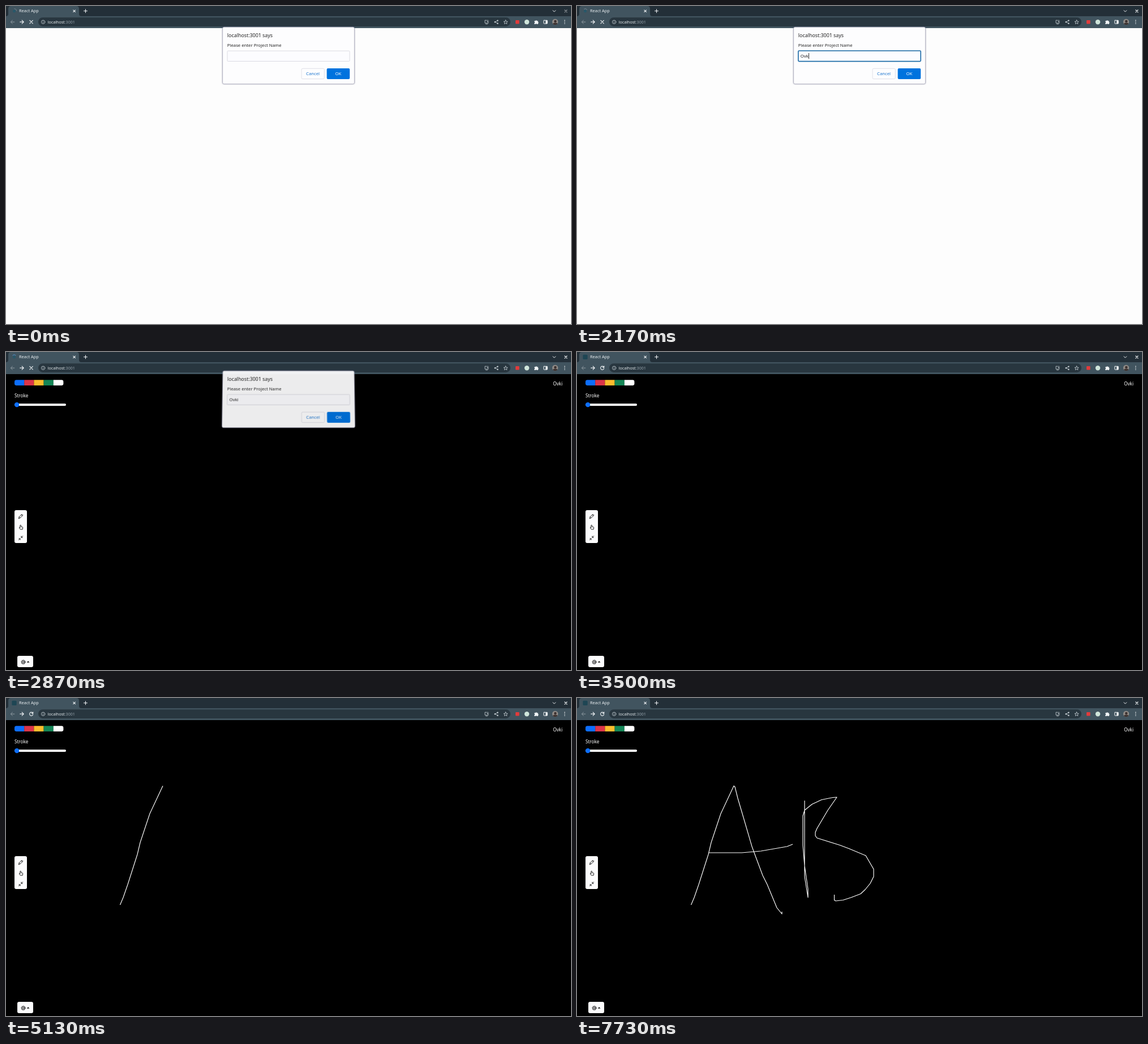
An HTML page for the animation above (8000 ms loop, 998 by 561 pixels).

```html
<!DOCTYPE html>
<html lang="en">
<head>
<meta charset="utf-8">
<title>Whiteboard</title>
<style>
  html, body { margin: 0; width: 100%; height: 100%; overflow: hidden; }
  body { position: relative; background: #fdfdfd; }
  svg { position: absolute; left: 0; top: 0; display: block; }
  text { font-family: "Noto Sans", "Open Sans", sans-serif; white-space: pre; }
  .line { fill: none; stroke: #f1f4f6; stroke-linecap: round; stroke-linejoin: round; }
  .ink { fill: none; stroke: #111; stroke-width: .9; stroke-linecap: round; stroke-linejoin: round; }
  #app { --paper: #f7f7fd; --button: #f7f7fb; }
  #app.dark { --paper: #fff; --button: #fcfcfd; }
  .paper { fill: var(--paper); }
  .button { fill: var(--button); }
  #dialog { transform-origin: 499px 65px; }
  #card { filter: drop-shadow(0 .6px 1px #4a4a6a99); }
</style>
</head>
<body>
<svg width="998" height="561">
  <rect id="page" y="38" width="998" height="523"/>

  <g id="app">
    <clipPath id="pill"><rect x="15" y="49.3" width="86.5" height="9.6" rx="3.4"/></clipPath>
    <g clip-path="url(#pill)">
      <rect x="15" y="49" width="17.2" height="10" fill="#0d6efd"/>
      <rect x="32.2" y="49" width="17.2" height="10" fill="#dc3549"/>
      <rect x="49.4" y="49" width="17.2" height="10" fill="#fdbd2e"/>
      <rect x="66.6" y="49" width="17.2" height="10" fill="#148656"/>
      <rect x="83.8" y="49" width="18" height="10" class="paper"/>
    </g>
    <text class="paper" x="15" y="79.5" font-size="8.1">Stroke</text>
    <rect class="paper" x="15" y="91" width="91" height="4.1" rx="2"/>
    <circle cx="19.2" cy="93" r="4.2" fill="#0d6efd"/>
    <text class="paper" x="983" y="58.7" font-size="8.1" text-anchor="end">Ovki</text>

    <rect class="button" x="15" y="279" width="22" height="58" rx="3"/>
    <g class="ink">
      <path d="M22.3 293.6l.9-2.7 4.8-4.8 1.8 1.8-4.8 4.8zM26.8 287.3l1.8 1.8M23.2 290.9l1.8 1.8"/>
      <path d="M24.8 309.5v-3.7q.9-1.2 1.8 0v2.4l2.4.5q.8.3.7 1.3l-.5 2.9h-3.9l-2.1-2.9q.2-1.2 1.6-.5z"/>
      <path d="M29.6 324.6l-2.6 2.6m0-2.3v2.3h2.3M22.4 331.7l2.6-2.6m-2.3 0H25v2.3"/>
    </g>
    <rect class="button" x="20" y="536" width="28" height="20" rx="3"/>
    <g class="ink">
      <circle cx="30.6" cy="547" r="3.1"/>
      <circle cx="30.6" cy="547" r="3.8" stroke-dasharray="1 1.98" stroke-linecap="butt"/>
      <circle cx="30.6" cy="547" r="1.4"/>
    </g>
    <path d="M36.7 547.7l2.4-2.6 2.4 2.6z" fill="#111"/>
  </g>

  <g id="strokes" fill="none" stroke="#fff" stroke-width="1.15" stroke-linejoin="round"></g>

  <rect width="998" height="18" fill="#232f38"/>
  <rect y="18" width="998" height="21" fill="#41545f"/>
  <path d="M0 18q4 0 4-4V5q0-5 5-5h115q5 0 5 5v9q0 4 4 4z" fill="#41545f"/>
  <rect x="57" y="20.3" width="834" height="15.6" rx="7.8" fill="#28363f"/>

  <g id="favicon"></g>
  <text x="23" y="11.4" font-size="7.4" fill="#e9eef1">React App</text>
  <g class="line">
    <path d="M118.8 7.1l3.6 3.6m0-3.6l-3.6 3.6M137.5 8.8h6m-3-3v6" stroke-width="1.1"/>
    <path d="M966 7.8l2.4 2.4 2.4-2.4"/>
    <path id="close" d="M986.9 7l4 4m0-4l-4 4" stroke-width="1.2"/>
    <path d="M14.8 28.2H8.4m3-3l-3 3 3 3" stroke="#8e9aa1" style="stroke:#8e9aa1"/>
    <path d="M24.8 28.2h6.4m-3-3l3 3-3 3" stroke-width="1.2"/>
    <path id="stop" d="M41.9 25.4l5.4 5.4m0-5.4l-5.4 5.4" stroke-width="1.2"/>
    <path id="reload" d="M47.3 26.6a3.1 3.1 0 1 0 .4 2.3M47.8 24.7v2.4h-2.4" stroke-width="1.1"/>
    <g style="stroke:#cbd3d8" stroke-width=".8">
      <circle cx="65.6" cy="28.2" r="3.2"/>
      <path d="M65.6 28v1.8M65.6 26.5v.1"/>
      <path d="M849 25.2h-3v5h6v-1.2M847.5 31.8h3M851 24.8v3.4m-1.5-1.5l1.5 1.5 1.5-1.5"/>
      <path d="M868.2 25.8l-4.4 2.4 4.4 2.4"/>
      <path d="M882.6 24.8l1 2.4 2.6.2-2 1.7.6 2.5-2.2-1.4-2.2 1.4.6-2.5-2-1.7 2.6-.2z"/>
    </g>
    <rect x="949.8" y="25.3" width="6.4" height="5.8" rx=".5"/>
  </g>
  <g fill="#cbd3d8">
    <circle cx="868.4" cy="25.7" r="1.2"/><circle cx="863.8" cy="28.2" r="1.2"/><circle cx="868.4" cy="30.7" r="1.2"/>
  </g>
  <text x="73.7" y="30.7" font-size="7.1" fill="#e4eaed">localhost<tspan fill="#98a5ad">:3001</tspan></text>
  <rect x="900" y="25" width="6.6" height="6.4" rx="1" fill="#e23b3b"/>
  <circle cx="920" cy="28.2" r="4.2" fill="#cfe5da"/>
  <g fill="#f1f4f6">
    <path d="M933.3 26.2h2a1.3 1.3 0 0 1 2.5 0h1.9v2a1.3 1.3 0 0 1 0 2.5v1.3h-2a1.2 1.2 0 0 0-2.3 0h-2.1v-2a1.2 1.2 0 0 0 0-2.3z"/>
    <path d="M953.2 25.3h3v5.8h-3z"/>
    <circle cx="986.8" cy="25.4" r=".8"/><circle cx="986.8" cy="28.2" r=".8"/><circle cx="986.8" cy="31" r=".8"/>
  </g>
  <clipPath id="round"><circle cx="970" cy="28" r="5.2"/></clipPath>
  <g clip-path="url(#round)">
    <path d="M964 22h12v12h-12z" fill="#8f8a86"/>
    <circle cx="970.3" cy="27" r="2.3" fill="#3c3230"/>
    <path d="M965 34q0-4.6 5.2-4.6t5.2 4.6z" fill="#3c3230"/>
  </g>
</svg>

<svg id="dialog" width="998" height="561">
  <rect id="card" x="382.6" y="37.2" width="232.8" height="100.2" rx="2.5" fill="#fdfdfe" stroke="#9a9aae" stroke-width=".6"/>
  <text x="390.8" y="54.8" font-size="8.85" fill="#222">localhost:3001 says</text>
  <text x="390.8" y="71.6" font-size="7.73" fill="#222">Please enter Project Name</text>
  <rect x="391" y="79.2" width="216" height="18.3" rx="1.2" fill="#fcfcff" stroke="#d3d3dc" stroke-width=".8"/>
  <rect id="ring" x="390.8" y="79" width="216.4" height="18.6" rx="1.5" fill="none" stroke="#1c6ca8" stroke-width="1.6"/>
  <text id="entry" x="394.8" y="91" font-size="7.73" fill="#222"></text>
  <rect id="caret" y="83" width=".9" height="10.4" fill="#222"/>
  <rect x="522" y="110.3" width="40.3" height="18.3" rx="2" fill="#fdfdfe" stroke="#d8d8e2" stroke-width=".8"/>
  <text x="542.1" y="122.1" font-size="7.73" fill="#1b75cf" text-anchor="middle">Cancel</text>
  <rect x="566.6" y="110" width="40.6" height="18.9" rx="2" fill="#0073de"/>
  <text x="586.9" y="122.1" font-size="7.73" fill="#fff" text-anchor="middle">OK</text>
</svg>

<script>
const LOOP = 8000;
const FOCUS = 850, CLOSE = 2785, PAGE = 2815, DARK = 2870, LOADED = 3010;
const KEYS = [1830, 1990, 2160, 2310];
const NAME = 'Ovki';

// Each part of a stroke: start and end time, then the pointer path.
const STROKES = [
  [[4800, 5130, '201.5,365 207,352 215,329 232,276 237,255 254,204 277,155'],
   [5170, 5600, '279,157 284,177 292,204 309,262 313,273 328,313 336,329 353,370 362,381 362,377']],
  [[6010, 6300, '233,273 291,273 325,270 371,262 381,258']],
  [[6600, 7450, '402,181 402,315 408,352 408,337 402,296 399,260 399,208 402,198 415,187.5 432,179.5 452,175.5 ' +
    '459,175 443,198 424,230 421,237 421,243 424,247 464,259.5 480,265.5 510,278 524,302 524,315 518,327 ' +
    '509,338 501,345.5 484,352 470,356.5 457,358 454.5,356.5 454.5,347']],
];

const $ = id => document.getElementById(id);
const clamp = x => Math.max(0, Math.min(1, x));
const show = (id, on) => { $(id).style.display = on ? '' : 'none'; };

const lines = STROKES.map(parts => {
  const line = document.createElementNS('http://www.w3.org/2000/svg', 'polyline');
  $('strokes').append(line);
  const points = parts.flatMap(([start, end, path]) => {
    const list = path.split(' ');
    return list.map((xy, i) => ({ xy, at: start + (end - start) * i / (list.length - 1) }));
  });
  return { line, points };
});

function drawFavicon(t) {
  if (t >= LOADED) {
    $('favicon').innerHTML = '<rect x="10.4" y="4.8" width="8.2" height="8.2" rx="1.5" fill="#1e4654"/>';
    return;
  }
  const color = t < PAGE ? '#82939d' : '#5aa0e8';
  const turn = t * (t < PAGE ? -.18 : .36);
  $('favicon').innerHTML = '<circle cx="14.5" cy="8.9" r="2.5" fill="#28586a"/>' +
    `<path d="M14.5 4.9a4 4 0 0 1 4 4" fill="none" stroke="${color}" stroke-width=".8" transform="rotate(${turn} 14.5 8.9)"/>`;
}

function drawDialog(t) {
  const closing = clamp((t - CLOSE) / 170);
  const focus = t < CLOSE ? clamp((t - FOCUS + 50) / 100) : 0;
  const typed = KEYS.filter(k => t >= k).length;
  const blinkStart = typed ? KEYS[typed - 1] : FOCUS;

  show('dialog', closing < 1);
  $('dialog').style.opacity = 1 - closing ** 4;
  $('dialog').style.transform = closing
    ? `translateY(${-6 * (1 - (1 - closing) ** 1.7)}px) perspective(1000px) rotateX(${14 * closing}deg)` : 'none';
  $('ring').style.opacity = focus;
  $('close').style.opacity = .5 + .5 * (t < CLOSE ? focus : 1);
  $('entry').textContent = NAME.slice(0, typed);
  show('caret', t >= FOCUS && t < CLOSE && (t - blinkStart) % 1000 < 500);
  if (closing < 1) $('caret').setAttribute('x', 395 + $('entry').getComputedTextLength());
}

function render(t) {
  const dark = t >= DARK;
  $('page').setAttribute('fill', dark ? '#000' : '#fdfdfd');
  $('app').classList.toggle('dark', dark);
  show('app', t >= PAGE);
  show('stop', t < LOADED);
  show('reload', t >= LOADED);
  drawFavicon(t);
  drawDialog(t);
  for (const { line, points } of lines)
    line.setAttribute('points', points.filter(p => p.at <= t).map(p => p.xy).join(' '));
}

const begin = performance.now();
function tick() {
  render((performance.now() - begin) % LOOP);
  requestAnimationFrame(tick);
}
tick();
</script>
</body>
</html>
```
